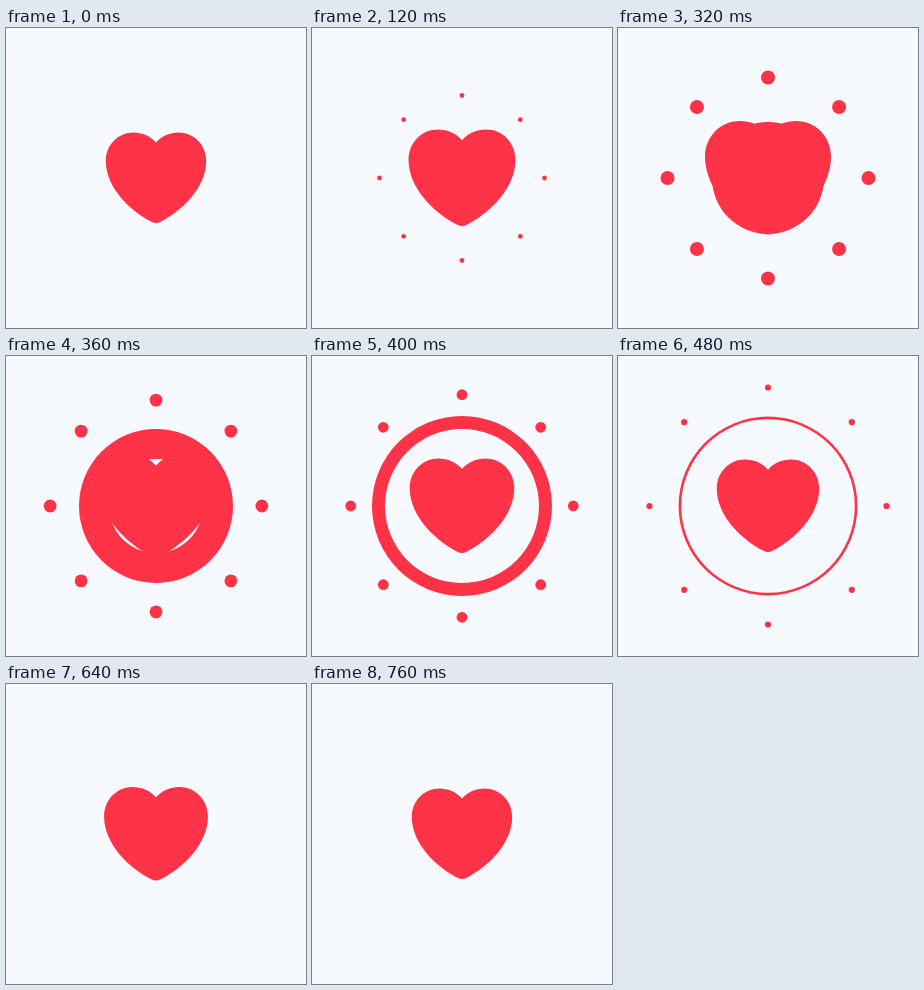
An HTML page with a canvas that plays this animation: 300x300 px, repeating every 920 ms.

```html
<!DOCTYPE html>
<html>
<head>
<meta charset="utf-8">
<title>Heart burst</title>
<style>
  html, body { margin: 0; width: 100%; height: 100%; overflow: hidden; background: #f6faff; }
  canvas { display: block; width: 300px; height: 300px; }
</style>
</head>
<body>
<canvas id="stage" width="300" height="300"></canvas>
<script>
const ctx = document.getElementById('stage').getContext('2d');
const RED = '#ff3347';
const BACKGROUND = '#f6faff';
const LOOP = 920;
const STEP = 40;
const LAST = 760;

// Each track is a list of [time, value] keys.
const heartScale = [[0, 1], [40, 1.008], [80, 1.03], [200, 1.135], [320, 1.255],
  [360, 1.135], [400, 1.042], [440, 1.018], [480, 1.02], [520, 1.033],
  [560, 1.042], [600, 1.042], [640, 1.035], [720, 1.008], [760, 1]];
const ringOuter = [[200, 0], [320, 56], [360, 77], [400, 90], [480, 89.4], [560, 89]];
const ringInner = [[320, 0], [360, 47], [400, 77], [440, 83.5], [480, 86.8], [520, 88.3], [560, 89]];
const dotRadius = [[40, 0], [200, 4.8], [240, 5.8], [280, 6.6], [320, 7], [360, 6.4],
  [400, 5.4], [480, 3.1], [520, 2], [560, 1], [600, 0]];
const dotDistance = [[0, 77.5], [80, 79.5], [200, 88.5], [320, 100.5], [400, 111.3],
  [440, 115.3], [480, 118.5], [520, 121], [560, 122.3]];

function valueAt(keys, t) {
  if (t <= keys[0][0]) return keys[0][1];
  for (let i = 1; i < keys.length; i++) {
    const [t0, v0] = keys[i - 1];
    const [t1, v1] = keys[i];
    if (t <= t1) return v0 + (v1 - v0) * (t - t0) / (t1 - t0);
  }
  return keys[keys.length - 1][1];
}

const heart = new Path2D(
  'M0 -35.5 C-5.5 -42 -14 -45.5 -22.5 -45.5 C-38 -45.5 -50.2 -33 -50.2 -17 ' +
  'C-50.2 10 -25 33.5 -4.5 43.8 Q0 46.2 4.5 43.8 ' +
  'C25 33.5 50.2 10 50.2 -17 C50.2 -33 38 -45.5 22.5 -45.5 C14 -45.5 5.5 -42 0 -35.5 Z');

function drawHeart(scale) {
  ctx.save();
  ctx.scale(scale, scale);
  ctx.fill(heart);
  ctx.restore();
}

function drawRing(outer, inner) {
  if (outer <= inner) return;
  ctx.beginPath();
  ctx.arc(0, 0, outer, 0, Math.PI * 2);
  if (inner > 0) {
    ctx.moveTo(inner, 0);
    ctx.arc(0, 0, inner, 0, Math.PI * 2);
  }
  ctx.fill('evenodd');
}

function drawDots(distance, radius) {
  if (radius <= 0) return;
  for (let i = 0; i < 8; i++) {
    const angle = i * Math.PI / 4;
    ctx.beginPath();
    ctx.arc(distance * Math.cos(angle), distance * Math.sin(angle), radius, 0, Math.PI * 2);
    ctx.fill();
  }
}

function draw(now) {
  const t = Math.min(LAST, Math.floor((now % LOOP) / STEP) * STEP);
  ctx.setTransform(1, 0, 0, 1, 0, 0);
  ctx.fillStyle = BACKGROUND;
  ctx.fillRect(0, 0, 300, 300);
  ctx.translate(150, 150);
  ctx.fillStyle = RED;
  drawDots(valueAt(dotDistance, t), valueAt(dotRadius, t));
  drawRing(valueAt(ringOuter, t), valueAt(ringInner, t));
  drawHeart(valueAt(heartScale, t));
}

const start = performance.now();
function tick() {
  draw(performance.now() - start);
  requestAnimationFrame(tick);
}
tick();
</script>
</body>
</html>
```
